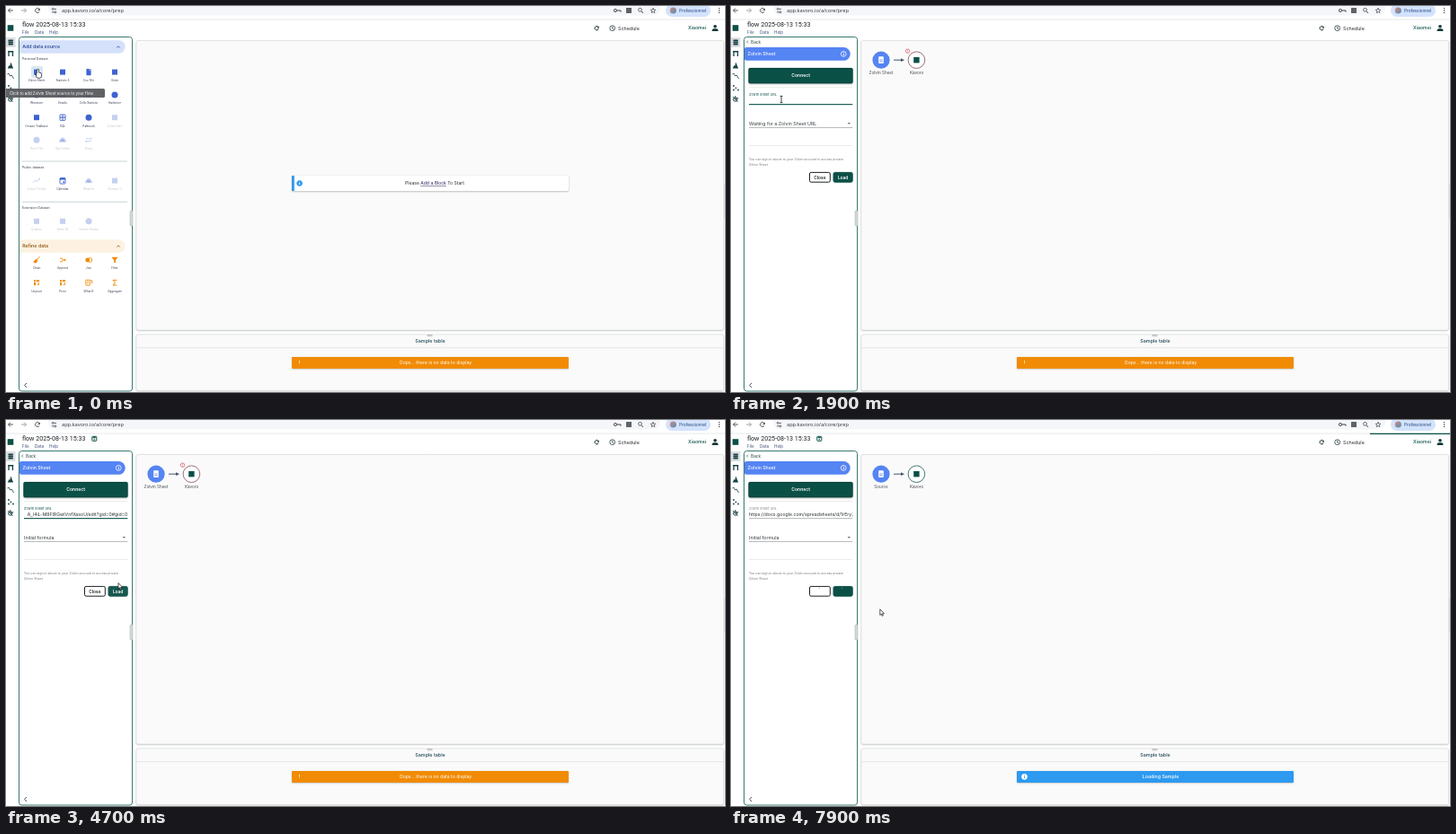
An HTML page with a canvas for the animation above (8000 ms loop, 800 by 430 pixels).

```html
<!DOCTYPE html>
<html lang="en">
<head>
<meta charset="utf-8">
<title>Flow editor</title>
<style>
html, body { margin: 0; width: 100%; height: 100%; overflow: hidden; background: #fff; }
canvas { display: block; width: 800px; height: 430px; }
</style>
</head>
<body>
<canvas id="stage"></canvas>
<script>
const W = 800, H = 430, LOOP = 8000;
const canvas = document.getElementById('stage');
const c = canvas.getContext('2d');
const dpr = Math.max(1, window.devicePixelRatio || 1);
canvas.width = W * dpr;
canvas.height = H * dpr;

const GREEN = '#0b5047', BLUE = '#3e63d0', SKY = '#5584f3', ORANGE = '#f18b05', INK = '#2b2f33';
const UI = 'Inter, "Open Sans", sans-serif', SYS = '"Open Sans", "Noto Sans", sans-serif';

// Moments of the interaction, in ms
const OPEN = 600, READY = 1500, FOCUS = 1900, LIST = 2150, PASTE = 2500, CHECK = 2850,
      CHECKED = 4300, SEND = 6450, SENT_BAR = 6745;

function text(s, x, y, size, color = INK, o = {}) {
  c.font = `${o.weight || 400} ${size}px ${o.font || UI}`;
  c.textAlign = o.align || 'left';
  c.fillStyle = color;
  c.fillText(s, x, y + size * 0.36);
}
const center = (s, x, y, size, color, weight) => text(s, x, y, size, color, { align: 'center', weight });

function rect(x, y, w, h, fill) {
  c.fillStyle = fill;
  c.fillRect(x, y, w, h);
}
function box(x, y, w, h, r, fill, stroke, lw = 1) {
  c.beginPath();
  c.roundRect(x, y, w, h, r);
  if (fill) { c.fillStyle = fill; c.fill(); }
  if (stroke) { c.strokeStyle = stroke; c.lineWidth = lw; c.stroke(); }
}
function disc(x, y, r, fill, stroke, lw = 1) {
  c.beginPath();
  c.arc(x, y, r, 0, 7);
  if (fill) { c.fillStyle = fill; c.fill(); }
  if (stroke) { c.strokeStyle = stroke; c.lineWidth = lw; c.stroke(); }
}
function line(color, lw, ...p) {
  c.beginPath();
  for (let i = 0; i < p.length; i += 2) c.lineTo(p[i], p[i + 1]);
  c.strokeStyle = color;
  c.lineWidth = lw;
  c.stroke();
}
function poly(color, ...p) {
  c.beginPath();
  for (let i = 0; i < p.length; i += 2) c.lineTo(p[i], p[i + 1]);
  c.fillStyle = color;
  c.fill();
}
function shadowed(draw, blur = 2, y = 0.7) {
  c.save();
  c.shadowColor = 'rgba(0,0,0,.28)';
  c.shadowBlur = blur * dpr;
  c.shadowOffsetY = y * dpr;
  draw();
  c.restore();
}
function reload(x, y, r, color, lw) {
  c.beginPath();
  c.arc(x, y, r, 0.5, 5.5);
  c.strokeStyle = color;
  c.lineWidth = lw;
  c.stroke();
  poly(color, x + r + 0.3, y - r, x + r + 0.3, y, x, y - 0.3);
}
function info(x, y, r, ring, mark, fill) {
  disc(x, y, r, fill, ring, 0.8);
  rect(x - 0.4, y - 0.5, 0.9, 2.2, mark);
  rect(x - 0.4, y - 1.9, 0.9, 0.9, mark);
}

function browserBar() {
  rect(0, 0, W, 11, '#fff');
  box(47, -8, 681, 18.5, 8, '#f4f6fa');
  line('#444', 0.9, 7.8, 5, 2.5, 5);
  line('#444', 0.9, 5, 2.5, 2.5, 5, 5, 7.5);
  line('#9a9a9a', 0.9, 17, 5, 22.5, 5);
  line('#9a9a9a', 0.9, 20, 2.5, 22.5, 5, 20, 7.5);
  reload(35, 5, 2.5, '#444', 0.9);
  line('#444', 0.8, 51, 3.4, 56, 3.4);
  line('#444', 0.8, 51, 6.8, 56, 6.8);
  disc(52.2, 3.4, 1, '#fff', '#444', 0.7);
  disc(54.8, 6.8, 1, '#fff', '#444', 0.7);
  text('app.kavoro.io/a/core/prep', 62, 5, 5.65, '#303236', { font: SYS });
  disc(678, 5, 1.6, null, '#444', 0.9);
  line('#444', 1, 679.6, 5, 684, 5, 684, 6.7);
  rect(690, 2, 6, 6, '#5f6368');
  disc(705.5, 4.3, 1.9, null, '#444', 0.8);
  line('#444', 0.9, 707, 5.8, 709, 8);
  c.beginPath();
  for (let i = 0; i < 10; i++) {
    const a = i * Math.PI / 5 - Math.PI / 2, r = i % 2 ? 1.3 : 3;
    c.lineTo(720 + Math.cos(a) * r, 5.2 + Math.sin(a) * r);
  }
  c.closePath();
  c.strokeStyle = '#444';
  c.lineWidth = 0.7;
  c.stroke();
  box(734, -2, 50, 14, 7, '#d3e3fd');
  const g = c.createLinearGradient(739, 2, 746, 8);
  g.addColorStop(0, '#d98b7c');
  g.addColorStop(1, '#4f8fb8');
  disc(742.3, 5, 3.6, g);
  text('Professionnel', 749, 5, 4.75, '#1c3f73', { font: SYS, weight: 500 });
  for (const y of [2.6, 5, 7.4]) disc(793.5, y, 0.7, '#333');
}

function header(t) {
  rect(0, 14.6, W, 0.9, '#e3e5e7');
  text('flow 2025-08-13 15:33', 18, 20, 7.1, '#202428', { font: 'Roboto, sans-serif' });
  text('File', 18, 29.5, 4.6, '#40517c');
  text('Data', 32, 29.5, 4.6, '#40517c');
  text('Help', 48, 29.5, 4.6, '#40517c');
  if (t >= PASTE) {
    box(95.8, 18.3, 5, 5, 0.6, null, GREEN, 1);
    rect(96.7, 18.8, 3, 1.4, GREEN);
    disc(98.3, 21.7, 0.8, GREEN);
  }
  reload(657.3, 24.7, 2.2, '#15282c', 1);
  disc(674.7, 24.7, 2.9, null, '#24383c', 0.8);
  line('#24383c', 0.8, 674.7, 22.8, 674.7, 24.9, 676.2, 25.8);
  text('Schedule', 681, 24.6, 5.4, '#24292d');
  text('Xiaomei', 759, 24.6, 5.2, GREEN, { weight: 500 });
  disc(789, 22.7, 1.8, '#12383a');
  box(785.6, 25.2, 6.8, 2.8, [1.8, 1.8, 0, 0], '#12383a');
}

function rail() {
  rect(1.7, 21.2, 6.6, 6.6, GREEN);
  rect(0, 35, 10.5, 11, '#dcdfe2');
  const ink = '#173f45';
  for (const y of [37.4, 39.6, 41.8]) box(2.4, y, 5.6, 1.8, 0.8, ink);
  rect(2.4, 50, 5.8, 1.5, ink);
  rect(2.4, 50, 1.3, 6, ink);
  rect(6.8, 50, 1.3, 6, ink);
  poly(ink, 1.8, 69.5, 3.5, 66, 4.2, 67, 5.6, 62.5, 6.6, 66, 8.2, 69.5);
  line(ink, 0.8, 1.4, 76, 3, 75, 4.6, 78, 6.2, 77, 8.6, 81);
  for (const [x, y] of [[3, 89], [3, 93.5], [5.4, 91.3], [8, 93.5]]) disc(x, y, 0.9, ink);
  disc(4.8, 104, 2.2, null, ink, 1);
  line(ink, 0.8, 2, 101, 7.6, 107);
  line(ink, 0.8, 4.8, 100, 4.8, 104, 8.3, 102.5);
}

function panels() {
  shadowed(() => box(145, 38.5, 653.5, 322.5, 2, '#fafafa'));
  shadowed(() => box(145, 366, 653.5, 62.5, 2, '#fafafa'));
  box(145, 38.5, 653.5, 322.5, 2, null, '#dcdedf', 0.7);
  box(145, 366, 653.5, 62.5, 2, null, '#dcdedf', 0.7);
  rect(145.5, 380.4, 652.5, 0.8, '#dcdfe1');
  rect(468.5, 366, 6, 0.7, '#a8a8a8');
  rect(468.5, 367.5, 6, 0.7, '#a8a8a8');
  center('Sample table', 472, 373.4, 5.4, '#1c4653', 500);
  box(14.5, 34.5, 126, 394.5, 3, '#fff', '#397871', 1);
  box(138, 228, 3, 17, 1, '#d4d8d9', '#a4adad', 0.5);
  rect(798.8, 198, 1.2, 39, '#dfe1e2');
  line('#37474f', 0.9, 23, 420, 20.5, 422.5, 23, 425);
}

const cols = [34, 63, 92, 121];

const icons = {
  block: (x, y, k) => rect(x - 3, y - 3, 6, 6, k),
  dot: (x, y, k) => disc(x, y, 3.5, k),
  file(x, y, k) {
    box(x - 2.6, y - 3.7, 5.2, 7.4, 0.8, k);
    poly('#fff', x + 0.7, y - 3.7, x + 2.6, y - 1.8, x + 0.7, y - 1.8);
  },
  mail(x, y, k) {
    box(x - 3.5, y - 2.7, 7, 5.4, 0.7, k);
    line('#fff', 0.7, x - 3, y - 2, x, y, x + 3, y - 2);
  },
  sql(x, y, k) {
    box(x - 3, y - 3.2, 6, 6.4, 0.7, null, k, 0.9);
    rect(x - 3, y - 0.6, 6, 1, k);
    rect(x - 0.5, y - 3, 1, 6, k);
  },
  swap(x, y, k) {
    line(k, 0.9, x - 3, y - 1.3, x + 3.5, y - 1.3, x + 2, y - 2.8);
    line(k, 0.9, x + 3, y + 1.3, x - 3.5, y + 1.3, x - 2, y + 2.8);
  },
  trend: (x, y, k) => line(k, 0.9, x - 4, y + 2.3, x - 1.2, y - 0.6, x + 0.6, y + 1, x + 3.8, y - 2.4, x + 1.8, y - 2.4),
  date(x, y, k) {
    box(x - 3, y - 3, 6, 6.4, 0.6, null, k, 0.9);
    rect(x - 3, y - 3, 6, 2, k);
    rect(x + 0.4, y + 0.6, 1.6, 1.6, k);
  },
  cloud(x, y, k) {
    disc(x, y - 0.5, 2.3, k);
    box(x - 4, y - 0.4, 8, 3, 1.5, k);
  },
  broom(x, y, k) {
    line(k, 1, x + 3.5, y - 4, x, y);
    poly(k, x - 0.8, y - 1.2, x + 1.4, y + 0.8, x - 0.4, y + 3.6, x - 4, y + 2.6);
  },
  merge(x, y, k) {
    line(k, 0.9, x - 3, y - 2, x - 1, y - 2, x + 0.5, y, x + 3.2, y);
    line(k, 0.9, x - 3, y + 2, x - 1, y + 2, x + 0.5, y);
    poly(k, x + 1.8, y - 1.8, x + 3.8, y, x + 1.8, y + 1.8);
  },
  join(x, y, k) {
    disc(x - 1.3, y, 2.4, k);
    disc(x + 1.3, y, 2.4, null, k, 0.9);
  },
  funnel: (x, y, k) => poly(k, x - 3.5, y - 3.2, x + 3.5, y - 3.2, x + 0.9, y + 0.3, x + 0.9, y + 3.5, x - 0.9, y + 2.4, x - 0.9, y + 0.3),
  grid(x, y, k) {
    rect(x - 3, y - 3, 2, 2, k);
    rect(x - 0.3, y - 3, 3.4, 2, k);
    rect(x - 3, y - 0.3, 2, 3.4, k);
    line(k, 0.9, x + 0.5, y + 2.2, x + 2.5, y + 2.2, x + 2.5, y);
  },
  what(x, y, k) {
    box(x - 3.2, y - 3, 4.6, 6, 0.5, null, k, 0.9);
    rect(x - 1.9, y - 1.5, 2, 0.8, k);
    rect(x - 1.9, y + 0.3, 2, 0.8, k);
    line(k, 0.9, x + 2.2, y - 2.4, x + 3.7, y - 2.4, x + 3.7, y + 1);
  },
  sum: (x, y, k) => line(k, 1, x + 2.3, y - 2.8, x - 2, y - 2.8, x + 0.5, y, x - 2, y + 2.8, x + 2.3, y + 2.8)
};

// A leading "~" marks a disabled entry
function row(y, color, entries) {
  entries.forEach(([icon, label], i) => {
    const off = label[0] === '~';
    c.globalAlpha = off ? 0.3 : 1;
    icons[icon](cols[i], y, color);
    center(off ? label.slice(1) : label, cols[i], y + 9.2, 3.2, off ? '#444' : '#3a3f55');
    c.globalAlpha = 1;
  });
}

function group(label, y, fill, ink) {
  box(15, y, 117.5, 14.5, [2, 7, 7, 2], fill);
  text(label, 18.2, y + 7.2, 5.35, ink, { weight: 500 });
  line(ink, 0.8, 123.3, y + 8.2, 125, y + 6.5, 126.7, y + 8.2);
}

function catalogue() {
  group('Add data source', 38.3, '#d5e0fb', '#24418f');
  for (const [s, y] of [['Personal Dataset', 59], ['Public dataset', 180], ['Extension Dataset', 225]])
    text(s, 18, y, 3.6, '#3b414a');
  rect(18, 172.6, 117, 0.8, '#bccacd');
  rect(18, 217.8, 117, 0.8, '#bccacd');
  box(28, 67, 13, 13, 2, '#d8e8f0');
  row(73.6, BLUE, [['block', 'Zolvin Sheet'], ['block', 'Statistic 4'], ['file', 'Csv File'], ['block', 'Gridz']]);
  row(99, BLUE, [['dot', 'Wexstore'], ['mail', 'Emails'], ['block', 'Cello Statistic'], ['dot', 'Hailstone']]);
  row(124.2, BLUE, [['block', 'Orvaxo Tealbase'], ['sql', 'SQL'], ['dot', 'Palbrook'], ['block', '~Zolvin Ads']]);
  row(149.2, BLUE, [['dot', '~Drive File'], ['cloud', '~Sky Folder'], ['swap', '~Proxy']]);
  row(194.6, BLUE, [['trend', '~Zolvin Trends'], ['date', 'Calendar'], ['cloud', '~Weather'], ['block', '~Chirrup / C']]);
  row(239.8, BLUE, [['block', '~Graphio'], ['block', '~Kelvo BI'], ['dot', '~Viewen Studio']]);
  group('Refine data', 260.3, '#fdf2e1', '#8a5008');
  row(283, ORANGE, [['broom', 'Clean'], ['merge', 'Append'], ['join', 'Join'], ['funnel', 'Filter']]);
  row(308.2, ORANGE, [['grid', 'Unpivot'], ['grid', 'Pivot'], ['what', 'What If'], ['sum', 'Aggregate']]);
}

function notices(t) {
  if (t < OPEN) {
    shadowed(() => box(318, 189, 308, 17, 1.5, '#fff'));
    rect(318, 189, 2.8, 17, '#2d98ee');
    info(326.6, 197.5, 2.9, '#2d98ee', '#fff', '#2d98ee');
    text('Please ', 444, 197.4, 5.05);
    const x = 444 + c.measureText('Please ').width;
    text('Add a Block', x, 197.4, 5.05, '#2b1f5a');
    const w = c.measureText('Add a Block').width;
    rect(x, 200, w, 0.5, '#2b1f5a');
    text(' To Start', x + w, 197.4, 5.05);
  }
  const busy = t >= SEND;
  shadowed(() => box(318, 391, 308, 13, 1, busy ? '#2d9af0' : ORANGE), 1.5, 0.5);
  if (busy) {
    info(326.5, 397.4, 3, '#fff', '#2d9af0', '#fff');
    center('Loading Sample', 478, 397.4, 5.3, '#fff', 500);
  } else {
    text('!', 325.6, 397.3, 5.4, '#fff', { weight: 600 });
    center('Oops... there is no data to display', 478, 397.4, 5.1, '#fff');
  }
}

function nodes(t) {
  const done = t >= SEND;
  disc(167, 60.2, 9.6, SKY);
  box(164.2, 56.3, 5.6, 7.6, 0.7, '#fff');
  rect(165.3, 59.6, 3.4, 0.7, SKY);
  rect(165.3, 61.4, 3.4, 0.7, SKY);
  line('#45526a', 1, 181, 60.2, 190.5, 60.2);
  poly('#45526a', 189, 58.3, 193, 60.2, 189, 62.1);
  disc(206.4, 60.2, 9.3, '#fff', done ? '#2c6a62' : '#8f5f6d', 0.9);
  rect(203.2, 57, 6.4, 6.4, GREEN);
  if (!done) {
    disc(196.5, 50.2, 2.2, '#fff', '#d84a5b', 0.7);
    rect(196.2, 48.8, 0.6, 1.7, '#d84a5b');
    rect(196.2, 51, 0.6, 0.6, '#d84a5b');
  }
  center(done ? 'Source' : 'Zolvin Sheet', 167, 74, 4.6, '#454b52');
  center('Kavoro', 206.6, 74, 4.6, '#454b52');
}

const smooth = p => p * p * (3 - 2 * p);

// Ring whose arc grows, then shrinks, while it turns
function spinner(x, y, r, color, ms) {
  const p = ms % 1500 / 1500, full = 125.66;
  const len = 1 + 88 * smooth(Math.min(1, p * 2));
  const from = p < 0.5 ? 35 * smooth(p * 2) : 35 + 89 * smooth(p * 2 - 1);
  const turn = ms / 2000, k = Math.PI * 2;
  c.beginPath();
  c.arc(x, y, r, (from / full + turn) * k, (Math.min(full, from + len) / full + turn) * k);
  c.strokeStyle = color;
  c.lineWidth = 1;
  c.stroke();
}

function progress(x, y, w, h, ms, color) {
  const part = (from, to, size, end, time) => {
    if (time < 0) return;
    const q = Math.min(1, time % 2100 / 1260);
    rect(x + w * (from + (to - from) * q), y, w * (size + (end - size) * q), h, color);
  };
  c.save();
  c.beginPath();
  c.rect(x, y, w, h);
  c.clip();
  part(-0.35, 1, 0.35, 0.9, ms);
  part(-1.01, 1.07, 1, 0.01, ms - 1150);
  c.restore();
}

function urlField(t) {
  const focused = (t >= FOCUS && t < 3050) || (t >= CHECKED && t < SEND);
  const filled = t >= PASTE;
  if (focused || filled) text('Zolvin Sheet URL', 20, 98.8, 3.8, focused ? GREEN : '#83888c');
  else text('Zolvin Sheet URL', 20, 105, 5.1, '#777c80');
  c.save();
  c.beginPath();
  c.rect(19.8, 100, 115.6, 9);
  c.clip();
  if (t >= SEND) text('https://docs.google.com/spreadsheets/d/1rEry2LbA_l4iL', 20, 105, 5.2);
  else if (filled) text('A_l4iL-M8FlRGwlVnfXasoU/edit?gid=0#gid=0', 135.3, 105, 5.2, INK, { align: 'right' });
  else if (focused && t % 1000 < 500) rect(20.2, 102, 0.5, 6, INK);
  c.restore();
  rect(20, 109.1, 115.3, focused ? 1.1 : 0.6, focused ? GREEN : '#8a8e91');
}

function button(label, x, w, fill, stroke, ink, spinAt, t) {
  box(x, 185.4, w, 10.8, 1.6, fill, stroke, 1);
  if (spinAt !== null) spinner(x + w / 2, 190.8, 3.5, ink, t - spinAt);
  else center(label, x + w / 2, 190.8, 4.8, ink, 600);
}

function form(t) {
  const checking = t >= CHECK && t < CHECKED, sending = t >= SEND;
  line('#41504f', 0.7, 19, 38.6, 17.6, 40.1, 19, 41.6);
  text('Back', 22, 40.1, 4.8, '#2c4a4a');
  box(15, 46, 117.7, 14.8, [2, 7.4, 7.4, 2], SKY);
  text('Zolvin Sheet', 18.6, 53.4, 5.2, '#fff', { weight: 500 });
  info(125.2, 53.4, 2.9, '#fff', '#fff');
  shadowed(() => box(19.5, 69, 116, 17.2, 1.5, GREEN), 2, 1);
  box(20, 69.4, 115, 16.4, 1.5, null, '#083f38', 0.7);
  if (t >= READY) center('Connect', 77.6, 77.6, 5.1, '#fff', 600);
  rect(20, 90.2, 115, 0.6, '#e0e3e4');
  urlField(t);
  const waiting = t < CHECKED;
  const grey = t >= PASTE && waiting;
  text(waiting ? 'Waiting for a Zolvin Sheet URL' : 'Initial formula', 20, 130.7, 5.25, grey ? '#a5a8aa' : '#353a3e');
  poly('#666', 129.6, 130, 133, 130, 131.3, 131.8);
  rect(20, 135.1, 115.3, 0.6, grey ? '#b4b7b9' : '#8a8e91');
  if (checking && t >= 3100) {
    for (const y of [108.8, 134.8]) progress(20, y, 115.3, 1, t - 3100, '#2f6b80');
  }
  rect(20, 155.2, 115.3, 0.6, '#dcdfe0');
  text('You can sign in above to your Zolvin account to access private', 20, 170.8, 3.55, '#777b80');
  text('Zolvin Sheet', 20, 177, 3.55, '#777b80');
  const spinAt = checking ? CHECK : sending ? SEND : null;
  button('Close', checking ? 86.8 : 87.5, 22.8, '#fff', '#1d2022', '#1d2022', spinAt, t);
  const hover = t >= 4650 && t < 7050;
  const fill = checking ? '#fff' : sending && hover ? '#3b7067' : hover ? '#16594f' : GREEN;
  button('Load', checking ? 113.3 : 114, 21.2, fill, checking ? '#49807a' : fill, checking ? '#2f6b64' : '#fff', spinAt, t);
}

function suggestions() {
  shadowed(() => box(61.2, 114, 100, 94, 2.5, '#fff'), 3, 1);
  for (let i = 0; i < 6; i++)
    text('https://docs.google.com/spre...', 66.4, 123.2 + i * 15.1, 5.2, '#27292c', { font: SYS, weight: 600 });
}

function tooltip() {
  box(0, 92, 110, 10, [0, 1.5, 1.5, 0], 'rgba(90,92,95,.96)');
  text('Click to add Zolvin Sheet source to your flow.', 4, 97, 4.4, '#fff');
}

const path = [[0, 35.5, 71], [650, 35.5, 71], [1050, 47.8, 88.5], [1450, 47.8, 88.5], [1850, 56, 104],
  [2900, 56, 104], [3450, 116.3, 161.5], [3900, 116.3, 161.5], [4700, 125, 181.5], [6200, 125, 181.5],
  [6400, 125.3, 190], [6950, 125.3, 190], [7650, 165.8, 210.8], [LOOP, 165.8, 210.8]];

function pointer(t) {
  const i = path.findIndex(k => k[0] > t), a = path[i - 1], b = path[i];
  const p = smooth((t - a[0]) / (b[0] - a[0]));
  const x = a[1] + (b[1] - a[1]) * p, y = a[2] + (b[2] - a[2]) * p;
  c.save();
  c.translate(x, y);
  c.lineJoin = 'round';
  if (t < OPEN) {
    c.beginPath();
    c.roundRect(-0.8, 0, 1.7, 6, 0.8);
    c.roundRect(-1.5, 3.4, 5, 5.4, 1.4);
    c.strokeStyle = '#111';
    c.lineWidth = 1.2;
    c.stroke();
    c.fillStyle = '#fff';
    c.fill();
    line('#111', 0.7, -1.5, 6.5, -3, 4.8);
  } else if (t >= 1800 && t < 2950) {
    line('#111', 0.8, 0, -3.5, 0, 3.5);
    line('#111', 0.8, -1.4, -3.6, 1.4, -3.6);
    line('#111', 0.8, -1.4, 3.6, 1.4, 3.6);
  } else {
    c.beginPath();
    for (const [u, v] of [[0, 0], [0, 6.6], [1.5, 5.3], [2.5, 7.6], [3.5, 7.1], [2.6, 4.9], [4.6, 4.8]]) c.lineTo(u, v);
    c.closePath();
    c.fillStyle = '#fff';
    c.fill();
    c.strokeStyle = '#111';
    c.lineWidth = 0.7;
    c.stroke();
  }
  c.restore();
}

function draw(t) {
  c.setTransform(dpr, 0, 0, dpr, 0, 0);
  rect(0, 0, W, H, '#fff');
  browserBar();
  header(t);
  rail();
  panels();
  notices(t);
  if (t < OPEN) {
    catalogue();
    tooltip();
  } else {
    nodes(t);
    form(t);
    if (t >= LIST && t < 3050) suggestions();
  }
  if (t >= SENT_BAR) progress(0, 14.5, W, 1.5, t - SENT_BAR, GREEN);
  pointer(t);
}

function tick() {
  draw(performance.now() % LOOP);
  requestAnimationFrame(tick);
}
tick();
</script>
</body>
</html>
```
